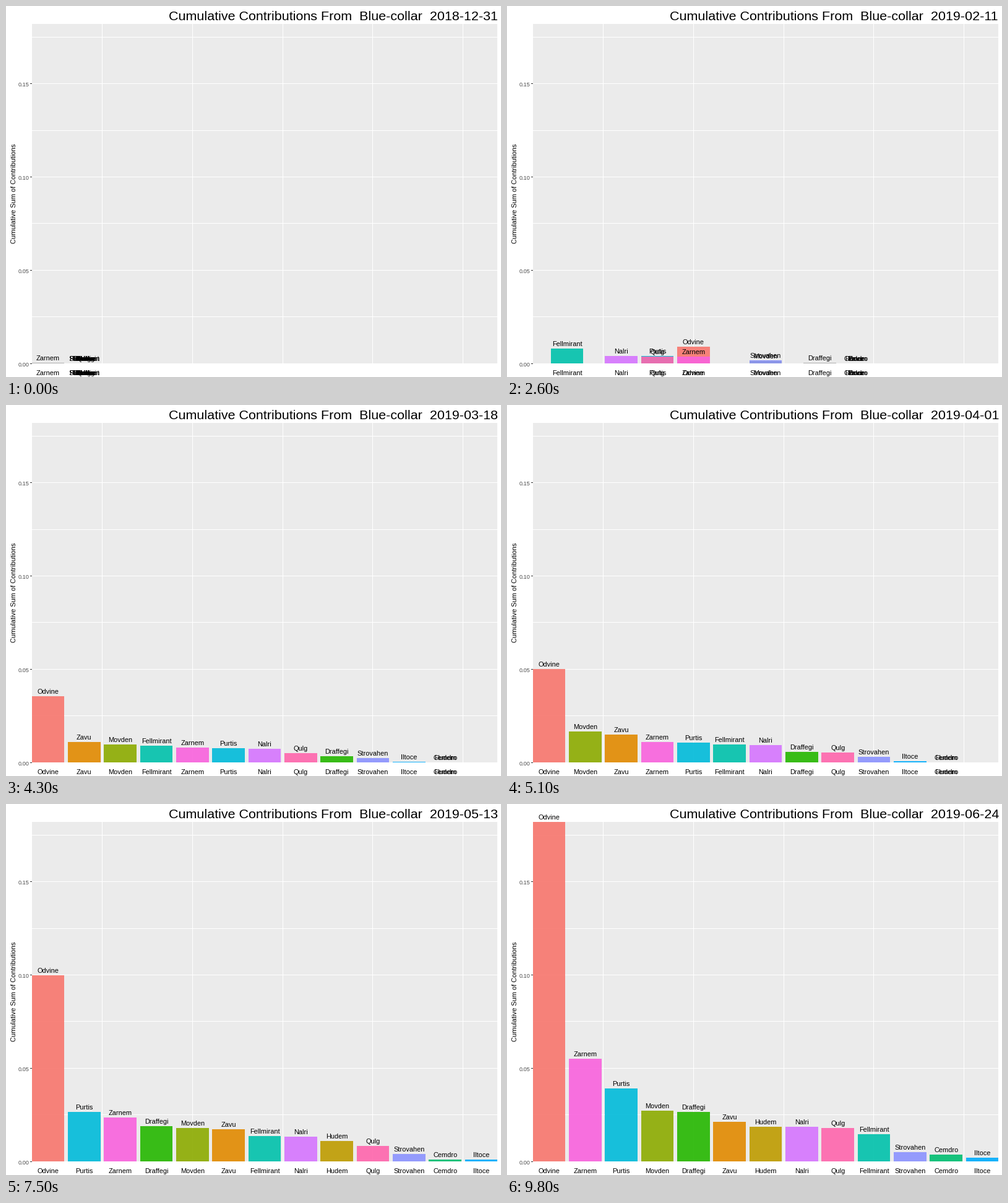
Recreate the animation shown at these times as a matplotlib script. Size 800 px wide and 600 px high, loop 10000 ms.

```python
import matplotlib.pyplot as plt
import numpy as np
from matplotlib.animation import FuncAnimation
from matplotlib.patches import Rectangle

W, H, DPI = 800, 600, 100
FRAMES, INTERVAL = 100, 100
LEFT, TOP, RIGHT, BASE = 42, 29, 794, 578
SCALE = 3016                  # pixels per unit of value
FIRST_X, STEP = 68, 58.33     # centre of slot 1 and slot spacing
HALF = 26.25                  # half a bar's width
START = np.datetime64("2018-12-31")

# name, colour, week: value in thousandths
TRACKS = [
    ("Odvine", "#F8766D", {6: 0, 7: 18, 9: 21.2, 13: 50, 16: 82.2, 19: 99.7, 25: 182}),
    ("Zavu", "#E18A00", {9: 0, 10: 9, 13: 14.8, 16: 15.6, 19: 17.3, 25: 21.2}),
    ("Hudem", "#BE9C00", {15: 0, 16: 7.2, 19: 10.9, 25: 18.6}),
    ("Movden", "#8CAB00", {4: 0, 5: 1.1, 7: 1.5, 9: 2.3, 13: 16.6, 16: 16.8, 19: 17.8, 25: 27.1}),
    ("Draffegi", "#24B700", {5: 0, 6: 0.2, 7: 0.4, 9: 0.6, 13: 5.7, 16: 15.5, 19: 18.9, 25: 26.4}),
    ("Cemdro", "#00BE70", {15: 0, 16: 0.3, 19: 1.1, 25: 3.6}),
    ("Fellmirant", "#00C1AB", {1: 0, 3: 4, 5: 8, 9: 8, 13: 9.7, 16: 10, 19: 13.6, 25: 14.6}),
    ("Purtis", "#00BBDA", {2: 0, 3: 2, 6: 3.8, 7: 4.1, 9: 4.3, 13: 10.7, 16: 15.2, 19: 26.6, 25: 39.1}),
    ("Iltoce", "#00ACFC", {8: 0, 9: 0.2, 13: 0.6, 16: 0.7, 19: 1, 25: 2}),
    ("Strovahen", "#8B93FF", {5: 0, 6: 1.6, 7: 1.4, 9: 1.9, 13: 3, 16: 3.2, 19: 4, 25: 5}),
    ("Nalri", "#D575FE", {1: 0, 3: 2.5, 6: 3.9, 7: 4.2, 9: 5, 13: 9.3, 16: 11.2, 19: 13.2, 25: 18.5}),
    ("Zarnem", "#F962DD", {0: 0.3, 6: 3.3, 7: 3.8, 9: 5.1, 13: 10.9, 16: 17.9, 19: 23.5, 25: 55}),
    ("Qulg", "#FF65AC", {0: 0, 6: 3, 7: 4.4, 9: 4.7, 13: 5.3, 16: 6.6, 19: 8.3, 25: 17.9}),
]

WEEKS = np.arange(26)
VALUES = np.array([np.interp(WEEKS, list(p), list(p.values())) for _, _, p in TRACKS]).T / 1000
# Tied values share the best rank.
RANKS = 1 + (VALUES[:, None, :] > VALUES[:, :, None] + 1e-9).sum(axis=2)

plt.rcParams["font.family"] = "Liberation Sans"
fig = plt.figure(figsize=(W / DPI, H / DPI), dpi=DPI, facecolor="white")
ax = fig.add_axes([0, 0, 1, 1])
ax.set_xlim(0, W)
ax.set_ylim(H, 0)
ax.axis("off")


def rect(x, y, w, h, color, z, **kw):
    box = Rectangle((x, y), w, h, facecolor=color, linewidth=0,
                    antialiased=False, zorder=z, **kw)
    return ax.add_patch(box)


def label(x, y, s, px, color="black", **kw):
    kw = {"ha": "center", "va": "baseline", "zorder": 5, **kw}
    return ax.text(x, y, s, fontsize=px * 72 / DPI, color=color, **kw)


def slot_x(rank):
    return FIRST_X + (rank - 1) * STEP


def draw_panel():
    rect(LEFT, TOP, RIGHT - LEFT, BASE - TOP, "#EBEBEB", 0)
    for i in range(1, 8):
        rect(LEFT, int(BASE - 0.025 * i * SCALE), RIGHT - LEFT, 1, "white", 1)
    for rank in np.arange(2.5, 13, 2.5):
        rect(int(slot_x(rank)), TOP, 1, BASE - TOP, "white", 1)
    for v in (0, 0.05, 0.1, 0.15):
        y = int(BASE - v * SCALE)
        rect(LEFT - 3, y, 3, 1, "#333333", 1)
        label(37.5, y + 5, f"{v:.2f}", 9.2, "#4D4D4D", ha="right")
    label(16, 303.5, "Cumulative Sum of Contributions", 11,
          rotation=90, rotation_mode="anchor")


draw_panel()
title = label(263, 23, "", 21.5, ha="left")
bars = [rect(0, BASE, 1, 0, c, 2 + 0.01 * i) for i, (_, c, _) in enumerate(TRACKS)]
tops = [label(0, 0, name, 11) for name, _, _ in TRACKS]
feet = [label(0, 597, name, 11) for name, _, _ in TRACKS]


def week_at(frame):
    """Three held frames per week, then one halfway; the last week comes a frame early."""
    week, part = divmod(frame + 1 + (frame >= 97), 4)
    return min(week, 25), 0.5 if part == 3 else 0


def update(frame):
    week, t = week_at(frame)
    nxt = min(week + 1, 25)
    values = VALUES[week] * (1 - t) + VALUES[nxt] * t
    ranks = RANKS[week] * (1 - t) + RANKS[nxt] * t
    day = START + np.timedelta64(7 * week, "D")
    title.set_text(f"Cumulative Contributions From  Blue-collar  {day}")
    for i, (value, rank) in enumerate(zip(values, ranks)):
        x, height = slot_x(rank), value * SCALE
        x0, x1 = round(x - HALF), round(x + HALF)
        thin = 0 < height < 1
        h = 1 if thin else round(height)
        bars[i].set_bounds(x0, BASE - h, x1 - x0, h)
        bars[i].set_facecolor("#A8A8A8" if thin else TRACKS[i][1])
        bars[i].set_alpha(0.9)
        bars[i].set_visible(h > 0)
        tops[i].set_position((x, round(BASE - height) - 4))
        feet[i].set_x(x)
    return [title, *bars, *tops, *feet]


anim = FuncAnimation(fig, update, frames=FRAMES, interval=INTERVAL,
                     init_func=lambda: update(0), repeat=True, repeat_delay=0, blit=False)
plt.show()
```
